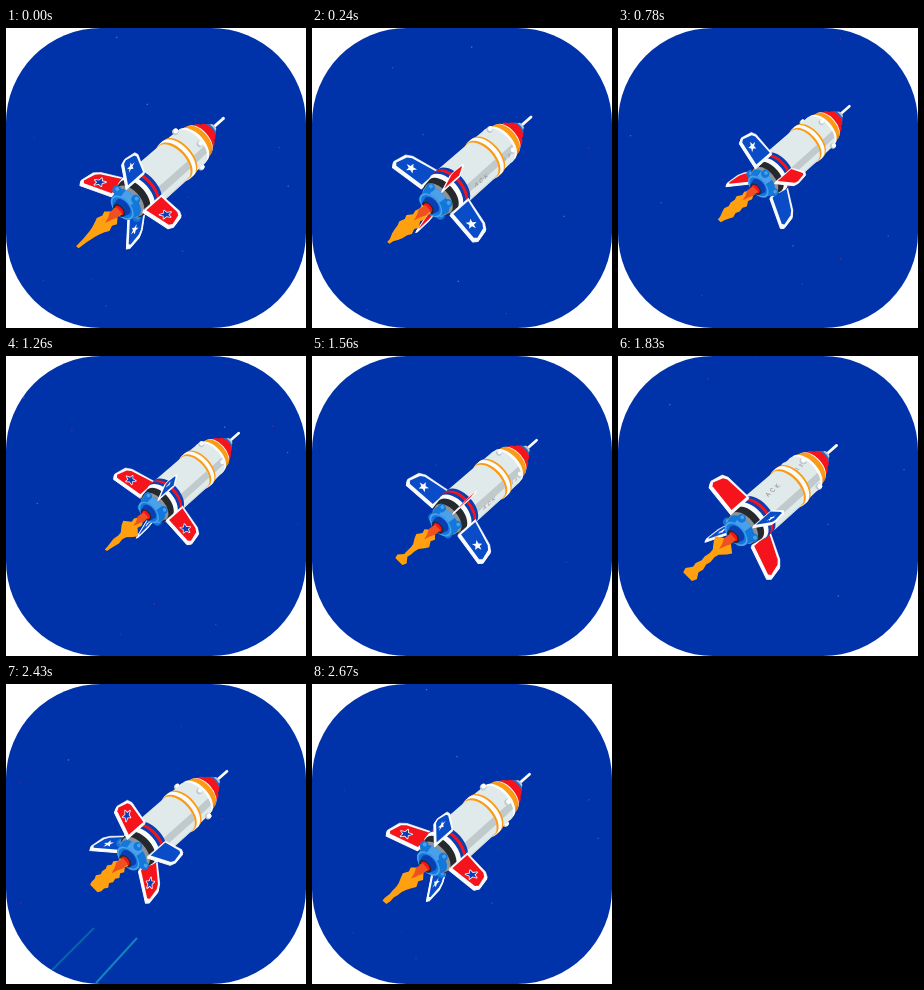
Recreate the animation shown at these times as an HTML page with a canvas. Size 300x300 px, loop 2700 ms.

```html
<!DOCTYPE html>
<html lang="en">
<head>
<meta charset="utf-8">
<title>Rolling rocket</title>
<style>
  html, body { margin: 0; width: 100%; height: 100%; overflow: hidden; background: #fff; }
  canvas { display: block; width: 300px; height: 300px; border-radius: 95px; background: #0033a9; }
</style>
</head>
<body>
<canvas id="stage" width="300" height="300"></canvas>
<script>
const ctx = document.getElementById('stage').getContext('2d');
const LOOP = 2700, STEP = 30, ROLL = 1350;
const TAU = Math.PI * 2, RAD = Math.PI / 180;
const TILT = 0.57;          // how far the tail faces the viewer
const HEADING = -0.723;

const C = {
  white: '#fafcfc', hull: '#e0eaea', shade: '#c0c9cc', red: '#f5141c', orange: '#fb9a14',
  navy: '#0a3fb4', panel: '#0a4cc8', blue: '#1278dc', sky: '#4ba0ea', dark: '#25282d',
  flame: '#ffa010', ember: '#f0501f'
};

// time, distance flown ahead
const DRIFT = [[0, 0], [480, 0.36], [780, 1], [1050, 1.16], [1260, 1.1],
  [1830, 0.08], [2430, 0.25], [2700, 0]];

// time, length, half widths from nozzle to tip
const FLAME = [[0, 50, 5, 9, 9, 5, 3, 2], [480, 43, 4, 7, 10, 9, 11, 4], [780, 48, 4, 6, 8, 7, 7, 3],
  [1260, 54, 3, 6, 12, 4, 4, 2], [1830, 55, 4, 12, 4, 4, 5, 8], [2430, 38, 6, 8, 9, 8, 9, 7],
  [2700, 50, 5, 9, 9, 5, 3, 2]];

// passing time, head x, y, tail dx, dy, colour
const STREAKS = [[480, 203, 62, 35, -27, '#0b73b4'], [480, 250, 125, 47, -47, '#0a69b0'],
  [2430, 45, 287, 43, -43, '#0a62ae'], [2430, 90, 299, 41, -45, '#1285bf']];
const STREAK_SPEED = 1.2;

let seed = 11;
const rand = () => (seed = seed * 16807 % 2147483647) / 2147483647;
const dots = Array.from({ length: 15 }, () => ({
  x: rand() * 340, y: rand() * 340, phase: rand() * TAU,
  color: rand() < 0.35 ? '#c32a5c' : '#8ea9dd'
}));

function segment(keys, t) {
  let i = 0;
  while (i < keys.length - 2 && t >= keys[i + 1][0]) i++;
  return i;
}

// Smooth periodic curve through the drift keys
function drift(t) {
  const n = DRIFT.length - 1, i = segment(DRIFT, t);
  const at = j => {
    const turn = Math.floor(j / n), k = DRIFT[j - turn * n];
    return [k[0] + turn * LOOP, k[1]];
  };
  const slope = j => {
    const a = at(j - 1), b = at(j + 1);
    return (b[1] - a[1]) / (b[0] - a[0]);
  };
  const a = at(i), b = at(i + 1), d = b[0] - a[0], u = (t - a[0]) / d;
  const v = 1 - u;
  return (1 + 2 * u) * v * v * a[1] + u * v * v * d * slope(i)
    + u * u * (3 - 2 * u) * b[1] - u * u * v * d * slope(i + 1);
}

// Axis position, radius and angle to the tilted plane
const spot = (s, r, a) => [s + TILT * r * Math.sin(a), r * Math.cos(a)];

function poly(points, fill, stroke, width) {
  ctx.beginPath();
  points.forEach(p => ctx.lineTo(p[0], p[1]));
  ctx.closePath();
  if (stroke) {
    ctx.strokeStyle = stroke;
    ctx.lineWidth = width;
    ctx.stroke();
  }
  ctx.fillStyle = fill;
  ctx.fill();
}

function disc(s, r, fill) {
  ctx.beginPath();
  ctx.ellipse(s, 0, TILT * r, r, 0, 0, TAU);
  ctx.fillStyle = fill;
  ctx.fill();
}

function tube(s0, r0, s1, r1, fill) {
  ctx.beginPath();
  ctx.ellipse(s1, 0, TILT * r1, r1, 0, -Math.PI / 2, Math.PI / 2);
  ctx.ellipse(s0, 0, TILT * r0, r0, 0, Math.PI / 2, Math.PI * 1.5);
  ctx.closePath();
  ctx.fillStyle = fill;
  ctx.fill();
}

function strip(s0, r0, s1, r1, from, to, fill) {
  const pts = [];
  for (let i = 0; i <= 4; i++) pts.push(spot(s1, r1, (from + (to - from) * i / 4) * RAD));
  for (let i = 4; i >= 0; i--) pts.push(spot(s0, r0, (from + (to - from) * i / 4) * RAD));
  poly(pts, fill);
}

function ball(s, r, a, size, fill) {
  const [x, y] = spot(s, r, a);
  ctx.beginPath();
  ctx.arc(x, y, size, 0, TAU);
  ctx.fillStyle = fill;
  ctx.fill();
}

const FIN = [[30, 20], [23, 50], [19, 56], [6, 59], [2, 56], [6, 20]];
const PANEL = [[28, 22], [21, 49], [18, 53], [7, 56.5], [4.5, 54], [8, 22]];
const STAR = Array.from({ length: 10 }, (_, i) => {
  const r = i % 2 ? 2.6 : 6.2, a = i * TAU / 10;
  return [13 + r * 0.85 * Math.sin(a), 42 + r * Math.cos(a)];
});

function fin(index, a) {
  const red = index % 2 === 0, front = Math.cos(a) > 0;
  const starred = [front, !front, !front, true][[0, 2, 1, 3].indexOf(index)];
  const place = pts => pts.map(p => spot(p[0], p[1], a));
  const face = place(FIN);
  poly(face.map(p => [p[0] - 1.4, p[1] + 0.8]), C.white, C.white, 1);
  poly(face, C.white, C.white, 0.6);
  poly(place(PANEL), red ? C.red : C.panel);
  if (starred) {
    const s = place(STAR);
    if (red) poly(s, C.navy, C.white, 1.6);
    else poly(s, C.white);
  }
}

function label(text, s, r, a, size) {
  const v = Math.sin(a);
  if (v < 0.12) return;
  const [x, y] = spot(s, r, a);
  ctx.save();
  ctx.transform(0.85, 0, -TILT * Math.cos(a), v, x, y);
  ctx.font = `${size}px "Liberation Sans", Arial, sans-serif`;
  ctx.textAlign = 'center';
  ctx.textBaseline = 'middle';
  ctx.fillStyle = '#8c7f86';
  [...text].forEach((ch, i) => ctx.fillText(ch, (i - 1) * size * 1.08, 0));
  ctx.restore();
}

function flame(t) {
  const i = segment(FLAME, t), a = FLAME[i], b = FLAME[i + 1];
  const u = (t - a[0]) / (b[0] - a[0]);
  const flick = Math.sin(u * Math.PI);
  const val = j => a[j] + (b[j] - a[j]) * u;
  const len = val(1) + 6 * flick * Math.sin(t / 37);
  const up = [], down = [];
  for (let j = 0; j < 6; j++) {
    const x = -7 - len * j / 5;
    const w = Math.max(1.5, val(j + 2) + 2 * flick * Math.sin(t / 29 + j * 2));
    up.push([x, -w], [x - len / 12, -w * 0.8]);
    down.unshift([x - len / 14, w * 0.75], [x + 1, w]);
  }
  poly([...up, ...down], C.flame);
  poly([[-5, -4], [-13, -5], [-18, -2], [-24, 0], [-17, 2], [-12, 4], [-5, 4]], C.ember);
}

function rocket(t) {
  const turn = 36 * RAD + t / ROLL * TAU;
  const fins = [0, 1, 2, 3].map(i => ({ i, a: turn + i * TAU / 4 }));
  const diag = fins.map(f => f.a + TAU / 8);
  const near = a => Math.sin(a) >= 0;
  const byDepth = (p, q) => Math.sin(p.a) - Math.sin(q.a);
  const nub = a => {
    ball(87, 22, a, 3.2, C.shade);
    ball(88, 22.5, a, 2.5, C.white);
  };
  const pod = a => {
    ball(5, 17, a, 4.5, C.blue);
    ball(6, 17.5, a, 2, C.sky);
  };

  const far = drift(t), size = 1 - 0.1 * far;
  ctx.save();
  ctx.translate(117 + 24 * far, 179 - 21 * far);
  ctx.rotate(HEADING);
  ctx.scale(size, size);
  ctx.lineJoin = ctx.lineCap = 'round';

  fins.filter(f => !near(f.a)).sort(byDepth).forEach(f => fin(f.i, f.a));
  diag.filter(a => !near(a)).forEach(a => { nub(a); pod(a); });

  // Nose
  ctx.strokeStyle = C.white;
  ctx.lineWidth = 2.8;
  ctx.beginPath();
  ctx.moveTo(120, 0);
  ctx.lineTo(134, 0);
  ctx.stroke();
  tube(116, 7, 120, 4, C.shade);
  tube(113, 9.5, 116, 7.5, C.blue);
  tube(107, 14.5, 113, 10, C.red);
  tube(101, 17.5, 107, 14.5, C.red);
  tube(99.5, 18.5, 101, 17.8, C.white);
  tube(93, 20.5, 99.5, 18.7, C.orange);
  strip(93, 20.5, 99.5, 18.7, 0, 35, '#e0831c');
  tube(90, 21.5, 93, 21, C.white);

  // Hull
  tube(74, 22, 90, 21.3, C.hull);
  strip(74, 22, 90, 21.3, 45, 68, C.shade);
  tube(73, 23, 75, 23, C.orange);
  tube(69, 23.2, 73, 23.2, C.white);
  tube(67, 22.6, 69, 22.6, C.orange);
  tube(27, 22.5, 67, 22, C.hull);
  strip(27, 22.5, 67, 22, 45, 68, C.shade);
  strip(27, 22.5, 67, 22, 0, 18, '#d0dadc');
  tube(25, 22.8, 28, 22.8, C.navy);
  tube(22, 22.8, 25, 22.8, C.red);
  tube(19, 22.6, 22, 22.6, C.navy);
  tube(15, 21.5, 19, 22.4, C.white);
  label('ACK', 44, 22.5, turn - 52 * RAD, 7);
  label('133', 82, 22, turn - 52 * RAD, 5.5);

  // Engine
  tube(9, 19.5, 15, 20.5, C.dark);
  tube(6, 17.5, 9, 18.5, '#8c9499');
  tube(-1, 14.5, 6, 17, C.blue);
  strip(-1, 14.5, 6, 17, 75, 130, C.sky);
  disc(-1, 14.5, C.sky);
  disc(-1, 12.5, C.blue);
  tube(-5, 8, 0, 9.5, C.navy);
  disc(-5, 7.5, C.dark);
  disc(-5, 5.5, C.red);

  diag.filter(near).forEach(a => { nub(a); pod(a); });
  fins.filter(f => near(f.a)).sort(byDepth).forEach(f => fin(f.i, f.a));
  flame(t);
  ctx.restore();
}

function sky(t) {
  for (const d of dots) {
    const go = t / LOOP * 340;
    ctx.globalAlpha = 0.3 + 0.3 * Math.sin(d.phase + t / LOOP * TAU * 3);
    ctx.fillStyle = d.color;
    ctx.fillRect((d.x - go + 340) % 340 - 20, (d.y + go) % 340 - 20, 1.3, 1.3);
  }
  ctx.globalAlpha = 1;
  ctx.lineWidth = 2;
  for (const [at, x, y, dx, dy, color] of STREAKS) {
    const go = (t - at) * STREAK_SPEED;
    const len = Math.hypot(dx, dy), ox = -dx / len * go, oy = -dy / len * go;
    ctx.strokeStyle = color;
    ctx.beginPath();
    ctx.moveTo(x + ox, y + oy);
    ctx.lineTo(x + dx + ox, y + dy + oy);
    ctx.stroke();
  }
}

function draw(now) {
  const t = Math.floor((now % LOOP) / STEP) * STEP;
  ctx.clearRect(0, 0, 300, 300);
  sky(t);
  rocket(t);
}

const start = performance.now();
function tick() {
  draw(performance.now() - start);
  requestAnimationFrame(tick);
}
tick();
</script>
</body>
</html>
```
